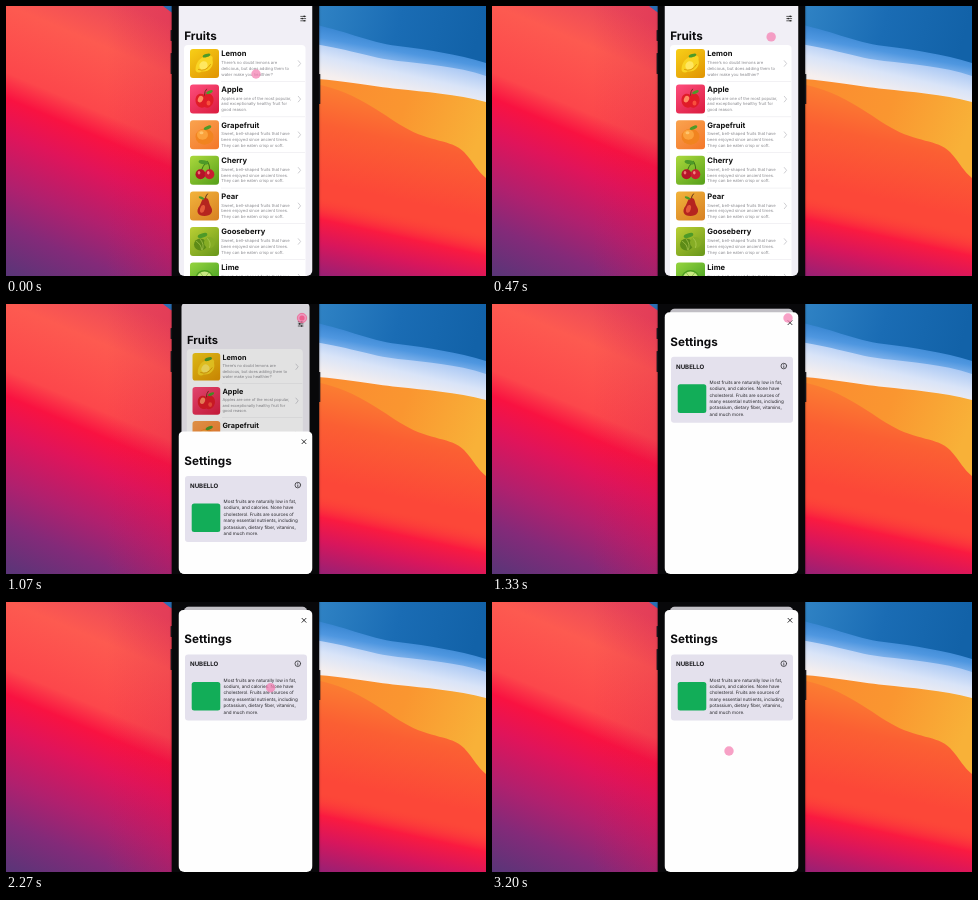
Recreate the animation shown at these times as an HTML page with a canvas. Size 480 by 270 pixels, loop 3270 ms.

```html
<!DOCTYPE html>
<html lang="en">
<head>
<meta charset="utf-8">
<title>Fruit list</title>
<style>
  html, body { margin: 0; width: 100%; height: 100%; overflow: hidden; background: #000; }
  canvas { display: block; width: 480px; height: 270px; }
</style>
</head>
<body>
<canvas id="stage"></canvas>
<script>
const W = 480, H = 270, LOOP = 3270;
const SCREEN = { x: 172.5, w: 134 };
const canvas = document.getElementById('stage');
const ctx = canvas.getContext('2d');
const dpr = window.devicePixelRatio || 1;
canvas.width = W * dpr;
canvas.height = H * dpr;

const SWEET = ['Sweet, bell-shaped fruits that have', 'been enjoyed since ancient times.', 'They can be eaten crisp or soft.'];
const FRUITS = [
  { name: 'Lemon', bg: ['#f6cb16', '#e29804'], art: lemon,
    text: ['There\u2019s no doubt lemons are', 'delicious, but does adding them to', 'water make you healthier?'] },
  { name: 'Apple', bg: ['#fb4a78', '#dd1f43'], art: apple,
    text: ['Apples are one of the most popular,', 'and exceptionally healthy fruit for', 'good reason.'] },
  { name: 'Grapefruit', bg: ['#f9a04c', '#f47a2c'], art: grapefruit, text: SWEET },
  { name: 'Cherry', bg: ['#a5d53a', '#5ba31c'], art: cherry, text: SWEET },
  { name: 'Pear', bg: ['#f0b03a', '#d98424'], art: pear, text: SWEET },
  { name: 'Gooseberry', bg: ['#b5cc32', '#6d9a1c'], art: gooseberry, text: SWEET },
  { name: 'Lime', bg: ['#8fd03c', '#3f9a20'], art: lime, text: SWEET }
];
const ABOUT = ['Most fruits are naturally low in fat,', 'sodium, and calories. None have', 'cholesterol. Fruits are sources of',
  'many essential nutrients, including', 'potassium, dietary fiber, vitamins,', 'and much more.'];

const clamp = v => Math.min(1, Math.max(0, v));
const span = (t, a, b) => clamp((t - a) / (b - a));
const smooth = u => u * u * (3 - 2 * u);

function gradient(x0, y0, x1, y1, stops) {
  const g = ctx.createLinearGradient(x0, y0, x1, y1);
  stops.forEach((s, i) => g.addColorStop(Array.isArray(s) ? s[0] : i / (stops.length - 1), Array.isArray(s) ? s[1] : s));
  return g;
}
function box(x, y, w, h, r, fill) {
  ctx.beginPath();
  ctx.roundRect(x, y, w, h, r);
  ctx.fillStyle = fill;
  ctx.fill();
}
function oval(x, y, rx, ry, fill, turn = 0) {
  ctx.beginPath();
  ctx.ellipse(x, y, rx, ry, turn, 0, 7);
  ctx.fillStyle = fill;
  ctx.fill();
}
function ring(x, y, r, color, width) {
  ctx.beginPath();
  ctx.arc(x, y, r, 0, 7);
  ctx.strokeStyle = color;
  ctx.lineWidth = width;
  ctx.stroke();
}
function shape(d, fill) {
  ctx.fillStyle = fill;
  ctx.fill(new Path2D(d));
}
function line(d, color, width) {
  ctx.strokeStyle = color;
  ctx.lineWidth = width;
  ctx.lineCap = 'round';
  ctx.stroke(new Path2D(d));
}
function label(str, x, y, size, weight, color) {
  ctx.font = `${weight} ${size}px Inter, Roboto, sans-serif`;
  ctx.fillStyle = color;
  ctx.fillText(str, x, y + size * 0.36);
}

// Fruit art is centred on 0,0 in a 29 px tile.
function leaf(x, y, turn, size = 4) { oval(x, y, size, size * 0.42, '#4d9a28', turn); }
function lemon() {
  shape('M-9 6C-9-2-3-8 4-7C6-9 9-7 8-4C10 3 4 9-3 8C-5 10-9 9-9 6Z', '#f9d423');
  oval(-1, 2, 4, 4.5, '#ffe760', 0.6);
  line('M-6 6Q1 9 6 1', '#dd9d0c', 1);
  leaf(2, -8, -0.3);
}
function apple() {
  shape('M0-4C4-8 10-4 9 2C8 8 3 10 0 8C-4 10-9 7-9 1C-9-5-4-7 0-4Z', '#e01c28');
  oval(-4, 0, 2.5, 3.5, '#ff8a60', 0.4);
  oval(4, 4, 2, 2.5, '#f8503c');
  line('M0-4Q0-8 2-10', '#70321c', 1);
  leaf(5, -7, -0.4, 3.5);
}
function grapefruit() {
  oval(0, 2, 9, 8, '#f18420');
  oval(-2, 0, 5.5, 5, '#fba23c');
  oval(-3, -2, 2, 1.5, '#ffc46d');
  leaf(3, -7, -0.4);
}
function cherry() {
  line('M-4 3Q-2-5 3-9Q6-4 5 3', '#3b6d16', 1);
  leaf(-1, -8, 0.2, 5);
  oval(-4, 4, 5, 5, '#b31428');
  oval(5, 4, 4.8, 5, '#c91d31');
  oval(-5.5, 2.5, 1.3, 1.7, '#f26f74');
  oval(3.8, 2.5, 1.3, 1.7, '#f68583');
}
function pear() {
  shape('M1-8C5-8 4-3 6 0C10 6 6 10 0 10C-7 10-9 5-5 0C-3-3-3-8 1-8Z', '#b5251f');
  oval(-2, 3, 2.3, 4, '#e4593a', 0.3);
  line('M1-8Q1-10 3-12', '#5f321b', 1);
  leaf(-3, -8, 0.4, 3);
}
function gooseberry() {
  oval(-4, 3, 6.5, 6, '#5d8b17');
  oval(5, 1, 5.5, 5.5, '#86ad25');
  line('M-8 0Q-3 3-3 8M-4-2Q0 3-2 8M3-3Q7 1 5 6', '#bcd660', 0.6);
  leaf(-2, -6, -0.3, 5);
}
function lime() {
  oval(0, 1, 9, 8, '#4c9e1f');
  oval(0, 1, 7.5, 6.5, '#c9e982');
  line('M-6 1H6M-4-4L4 6M4-4L-4 6', '#76b53a', 0.7);
}

function wallpaper() {
  // Left: tilted coral to purple
  ctx.fillStyle = gradient(100, -10, -15, 262, [[0, '#e9485a'], [0.16, '#fd5a50'], [0.37, '#fc474b'], [0.45, '#f91241'],
    [0.56, '#e0145a'], [0.72, '#b0206e'], [0.85, '#832a79'], [1, '#5a3578']]);
  ctx.fillRect(0, 0, 240, H);
  ctx.fillStyle = gradient(100, 0, 166, 0, ['rgba(205,20,80,0)', 'rgba(205,20,80,.22)']);
  ctx.fillRect(0, 0, 240, H);
  shape('M157 0H170V9Q163 5 157 0Z', '#2a6fb4');

  // Right: blue, pale, amber and red waves
  ctx.fillStyle = gradient(314, 0, 470, 40, ['#2f82c4', '#1a6cb4', '#1262a8']);
  ctx.fillRect(240, 0, 240, H);
  shape('M300 17C340 24 360 36 392 40S450 48 480 57V150H300Z', gradient(392, 28, 386, 62, ['#2f7fcc', '#4f97e0', '#a4c6f3']));
  shape('M300 37C340 42 365 52 392 55S450 60 480 70V150H300Z', gradient(392, 48, 384, 84, ['#a9c8f4', '#d9e4f8', '#f6efee']));
  shape('M300 72C340 75 365 80 392 83S450 88 480 96V270H300Z', gradient(320, 80, 470, 140, ['#fb8c30', '#fa9630', '#f8b138']));
  shape('M300 76C350 84 375 108 398 121C425 137 445 133 458 146C468 157 472 166 480 172V270H300Z',
    gradient(350, 78, 328, 180, [[0, '#fb8431'], [0.45, '#fb5f33'], [1, '#fc4738']]));
  ctx.fillStyle = gradient(313, 190, 295, 271, [[0, 'rgba(252,65,56,0)'], [0.27, '#fa1a40'], [0.55, '#d8165c'], [1, '#8d2278']]);
  ctx.fillRect(300, 150, 180, 120);
}

function phoneBody() {
  ctx.save();
  ctx.shadowColor = 'rgba(0,0,0,.4)';
  ctx.shadowBlur = 3 * dpr;
  box(165.7, -20, 147.5, 310, 0, '#08080a');
  ctx.restore();
  box(164.6, 24, 1.5, 11, 0.5, '#15151a');
  box(164.6, 47, 1.5, 21, 0.5, '#15151a');
  box(312.8, 68, 1.5, 30, 0.5, '#15151a');
}

function row(fruit, i) {
  const y = 57.5 + i * 35.6;
  ctx.save();
  ctx.translate(198.5, y);
  box(-14.5, -14.5, 29, 29, 3, gradient(-10, -14, 10, 14, fruit.bg));
  fruit.art();
  ctx.restore();
  label(fruit.name, 215.3, y - 9.8, 7.6, 700, '#111');
  fruit.text.forEach((s, n) => label(s, 215.3, y - 0.9 + n * 5.7, 4.18, 400, '#8a8a8f'));
  line(`M292.3 ${y - 2.8}l2.3 2.8l-2.3 2.8`, '#c2c2c7', 0.8);
  ctx.fillStyle = '#e4e3e8';
  ctx.fillRect(215, y + 17.5, 84, 0.5);
}

function fruitList(p) {
  ctx.save();
  const s = 1 - 0.08 * p;
  ctx.translate(240, 14 * p);
  ctx.scale(s, s);
  ctx.translate(-240, 0);
  box(SCREEN.x, -10, SCREEN.w, 290, 5, '#f1eff6');
  line('M294.7 10.4h5M294.7 12.6h5M294.7 14.8h5', '#222', 0.7);
  oval(298.2, 10.4, 0.8, 0.8, '#222');
  oval(296.2, 12.6, 0.8, 0.8, '#222');
  oval(298.2, 14.8, 0.8, 0.8, '#222');
  label('Fruits', 178.2, 29.3, 11.7, 700, '#0b0b0d');
  box(178, 39, 121.5, 260, 4, '#fff');
  FRUITS.forEach(row);
  if (p > 0) box(SCREEN.x, -10, SCREEN.w, 290, 5, `rgba(0,0,0,${0.2 * p})`);
  ctx.restore();
}

function settings(p) {
  ctx.save();
  ctx.translate(0, 272 * (1 - p));
  box(SCREEN.x, 8, SCREEN.w, 290, 5, '#fefefe');
  line('M296 16.3l4 4m0 -4l-4 4', '#1c1c1f', 0.9);
  label('Settings', 178.3, 37, 11.7, 700, '#0b0b0d');
  box(179, 52.5, 122, 66, 3, '#e4e1ed');
  label('NUBELLO', 184, 62, 6.1, 700, '#1a1a1e');
  ring(291.8, 61.7, 2.8, '#1a1a1e', 0.7);
  line('M291.8 61.5v1.7', '#1a1a1e', 0.7);
  oval(291.8, 60.1, 0.45, 0.45, '#1a1a1e');
  box(185.7, 80, 28.6, 28.6, 2.5, '#12ad58');
  ABOUT.forEach((s, n) => label(s, 217.6, 77.9 + n * 6.4, 4.54, 400, '#232327'));
  ctx.restore();
}

function pointer(t) {
  const a = smooth(span(t, 0, 780)), b = 1 - a, back = smooth(span(t, 2000, 2520));
  const x = b * b * 250 + 2 * a * b * 271 + a * a * 296 - 59 * back;
  const y = b * b * 68 + 2 * a * b * 37 + a * a * 14 + 135 * back;
  const press = Math.sin(Math.PI * span(t, 900, 1240));
  oval(x, y, 4.7, 4.7, 'rgba(244,128,178,.74)');
  if (press > 0) {
    oval(x, y, 2.6, 2.6, `rgba(236,60,110,${0.6 * press})`);
    ring(x, y, 4.7, `rgba(238,70,120,${0.6 * press})`, 0.9);
  }
}

function draw(t) {
  ctx.setTransform(dpr, 0, 0, dpr, 0, 0);
  ctx.textRendering = 'geometricPrecision';
  wallpaper();
  phoneBody();
  ctx.save();
  ctx.beginPath();
  ctx.roundRect(SCREEN.x, -20, SCREEN.w, 290, 6);
  ctx.clip();
  const p = 1 - Math.pow(1 - span(t, 975, 1375), 3);
  fruitList(p);
  if (p > 0) settings(p);
  ctx.restore();
  pointer(t);
}

const start = performance.now();
function tick() {
  draw((performance.now() - start) % LOOP);
  requestAnimationFrame(tick);
}
tick();
</script>
</body>
</html>
```
